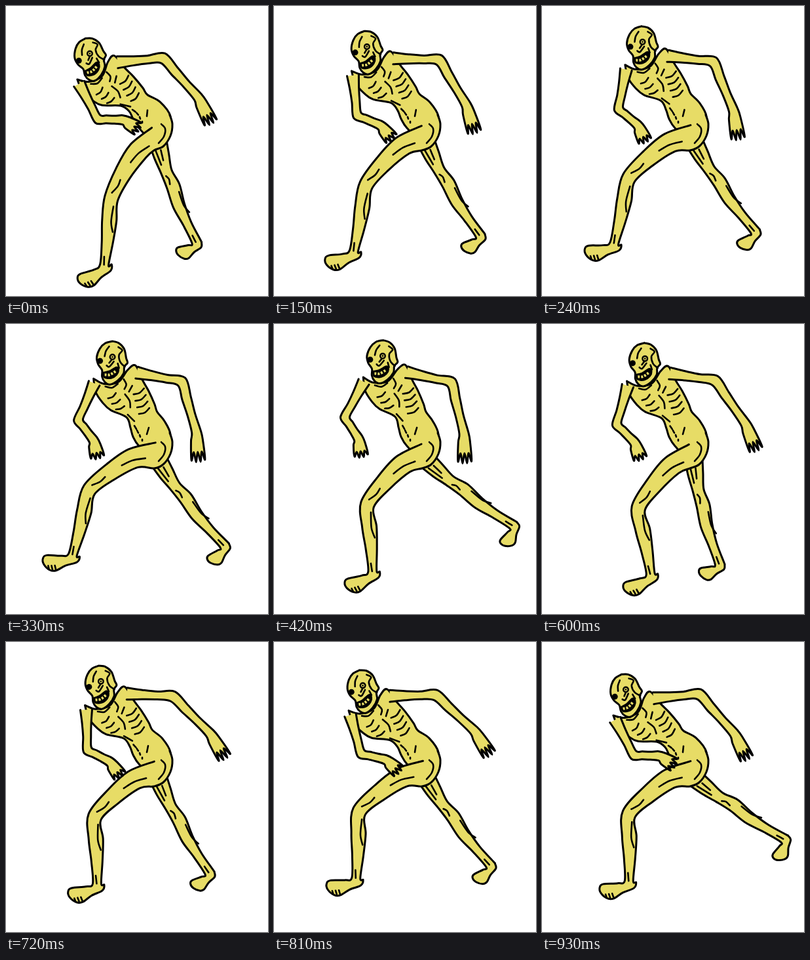
An HTML page with a canvas that plays this animation: 400 px wide and 442 px high, repeating every 0.96 s.

```html
<!DOCTYPE html>
<html lang="en">
<head>
<meta charset="utf-8">
<style>
  html, body { margin: 0; width: 100%; height: 100%; overflow: hidden; background: #fff; }
  canvas { display: block; }
</style>
</head>
<body>
<canvas id="stage" width="400" height="442"></canvas>
<script>
const ctx = document.getElementById('stage').getContext('2d');
const SKIN = '#e7dc66', INK = '#000';
const LOOP = 960, STEP = 30;
const PIVOT = [228, 190];

const rad = degrees => degrees * Math.PI / 180;
const clamp = u => Math.min(1, Math.max(0, u));
const blend = (a, b, u) => a.map((value, i) => value + (b[i] - value) * u);
const easeOut = u => u * (1.4 - 0.4 * u);
const points = text => text.split(' ').map(pair => pair.split(',').map(Number));

// Lean, then upper arm / forearm / hand angles, left and right.
const CROUCH = [15.5, 62, 2, 30, -5, 48, 63];
const UPRIGHT = [-1.2, 118, 58, 80, 13, 76, 88];
const PEAK = 420, CROUCHED = 930;

// Thigh / shin / foot angles, front and back; each stride ends in a cut.
const STRIDES = [
  { times: [0, 370, 480], poses: [
    [128, 96, 147, 73, 68, 149], [154.5, 105, 168, 55, 50, 130], [128, 70, 138, 28.5, 25.6, 102]] },
  { times: [570, 840, 930], poses: [
    [134, 77, 147, 85, 79, 156], [151, 94, 164, 55, 51, 132], [147.5, 90, 161, 36.5, 34.4, 110]] }
];

// Half widths run evenly from root to end, on the front and back of each limb.
const LIMBS = {
  leftArm: { root: [135, 90], lengths: [61, 38], front: [9, 7, 6, 7, 6, 6, 7], reach: 31 },
  rightArm: { root: [200, 74], lengths: [70, 79], front: [9, 7, 6, 8, 7, 6, 7], reach: 48 },
  frontLeg: {
    root: [236, 196], lengths: [123, 102], foot: 1,
    front: [17, 27, 22, 10, 10, 7, 6], back: [20, 4, 4, 11, 12, 10, 7],
    seat: points('250,166 254,180 251,198 240,214 226,220')
  },
  backLeg: {
    root: [234, 205], lengths: [73, 91.6], foot: 0.72,
    front: [16, 15, 12, 10, 12, 8, 6], back: [11, 8, 5, 10, 6, 5, 8]
  }
};
const FOOT = points('-10,6 -4,13 14,14 30,18 39,15 46,4 45,-5 38,-8 17,-2');

const TORSO = points('134,83 150,91 172,88 186,70 198,63 209,86 218,102 227,122 231,134 242,148 251,168 248,195 225,205 203,186 194,172 190,158 184,142 160,131 148,120 137,103 134,83');
const BODY_LINES = [
  '152,95 162,97 171,91', '180,84 184,92 181,99', '193,94 188,103',
  '182,107 189,117 190,127', '186,138 196,148', '218,158 215,168'
].map(points);
for (let i = 0; i < 4; i++) {
  const x = 195 + 2.7 * i, y = 107 + 10 * i;
  BODY_LINES.push([[x, y], [x + 9, y - 2], [x + 16, y - 9]]);
  BODY_LINES.push([[196 + 4 * i, 155 + 7 * i], [199 + 3 * i, 160 + 6 * i]]);
  if (i < 3) BODY_LINES.push([[156 + 6 * i, 113 + 8.5 * i], [163 + 6 * i, 111 + 9 * i], [168 + 6.5 * i, 105 + 10 * i]]);
}

const SKULL = points('163,26 173,29 181,38 184,52 186,59 181,65 180,75 171,86 159,92 151,88 147,80 147,70 141,61 139,50 144,37 152,29 163,26');
const FACE_LINES = [
  '158,34 153,41 151,49', '172,35 178,40 173,47 175,58 182,65',
  '165,57 158,65 154,63', '158,59 162,54', '171,60 173,67'
].map(points);
const MOUTH = points('149,74 158,72 169,66 172,70 169,77 161,82 151,81 149,74');
const TEETH = points('151,77 159,77 169,71');

// The chest turns about the pelvis; the waist bends in between.
function bend([x, y], lean) {
  const angle = -rad(lean) * clamp((165 - y) / 30);
  const c = Math.cos(angle), s = Math.sin(angle);
  const dx = x - PIVOT[0], dy = y - PIVOT[1];
  return [PIVOT[0] + dx * c - dy * s, PIVOT[1] + dx * s + dy * c];
}

// Point at a distance along a direction and sideways from it.
function offset([x, y], degrees, along, side) {
  const c = Math.cos(rad(degrees)), s = Math.sin(rad(degrees));
  return [x + along * c - side * s, y + along * s + side * c];
}

function trace(p) {
  ctx.beginPath();
  ctx.moveTo(...p[0]);
  for (let i = 0; i < p.length - 1; i++) {
    const before = p[Math.max(i - 1, 0)], a = p[i], b = p[i + 1];
    const after = p[Math.min(i + 2, p.length - 1)];
    ctx.bezierCurveTo(
      a[0] + (b[0] - before[0]) / 6, a[1] + (b[1] - before[1]) / 6,
      b[0] - (after[0] - a[0]) / 6, b[1] - (after[1] - a[1]) / 6, ...b);
  }
}

function line(p, width = 2.6, color = INK) {
  ctx.strokeStyle = color;
  ctx.lineWidth = width;
  trace(p);
  ctx.stroke();
}

function shape(p, fill = SKIN) {
  trace(p);
  ctx.fillStyle = fill;
  ctx.fill();
  line(p, 3);
}

function handOutline(reach) {
  const hand = [[reach * 0.25, -9]];
  for (let i = 0; i < 4; i++) {
    const side = -9 + 6 * i;
    hand.push([reach - 3 * Math.abs(i - 1.5), side * 1.15]);
    if (i < 3) hand.push([reach * 0.65, side + 3]);
  }
  return [...hand, [reach * 0.3, 9]];
}

function drawLimb({ root, lengths, front, back = front, reach, foot, seat = [] }, angles, start = root) {
  const [upper, lower, end] = angles;
  const middle = offset(start, upper, lengths[0], 0);
  const tip = offset(middle, lower, lengths[1], 0);
  const along = (u, side) => {
    if (u === 1) return offset(middle, (upper + lower) / 2, 0, side);
    return u < 1 ? offset(start, upper, u * lengths[0], side)
                 : offset(middle, lower, (u - 1) * lengths[1], side);
  };
  const mark = (...stops) => line(stops.map(([u, side]) => along(u, side)));
  const frontEdge = front.map((width, i) => along(i / 3, width));
  const backEdge = back.map((width, i) => along(i / 3, -width));
  const extremity = foot
    ? FOOT.map(([x, y]) => offset(tip, end, x * foot, -y * (foot + 1) / 2))
    : handOutline(reach).map(([x, y]) => offset(tip, end, x, y));
  if (seat.length) backEdge.shift();
  shape([...seat, ...backEdge, ...extremity, ...frontEdge.reverse()]);

  if (!foot) return;
  mark([0.94, 4], [0.83, 3], [0.75, 6]);
  mark([1.12, -5], [1.35, -4], [1.5, -8]);
  mark([1.88, 1], [2, 0]);
  if (seat.length) {
    mark([0.2, 3], [0.35, 9], [0.5, 10]);
    line(points('237,180 243,187 241,199 233,209'));
    for (let i = 0; i < 3; i++)
      line([[30 + 5 * i, 17 - 2 * i], [30 + 5 * i, 10 - i]].map(([x, y]) => offset(tip, end, x, -y)));
  } else {
    mark([0.15, 10], [0.5, 8]);
    mark([0.2, 2], [0.42, 3]);
  }
}

function drawHead(lean) {
  const place = list => list.map(point => bend(point, lean));
  const dot = (x, y, radius, color) => {
    ctx.beginPath();
    ctx.arc(...bend([x, y], lean), radius, 0, 7);
    ctx.fillStyle = color;
    ctx.fill();
  };
  shape(place(SKULL));
  FACE_LINES.forEach(stroke => line(place(stroke)));
  dot(144, 56, 4.5, INK);
  dot(163, 50, 5, INK);
  dot(163, 50, 2.5, SKIN);
  dot(163, 50, 1.3, INK);
  shape(place(MOUTH), INK);
  ctx.setLineDash([3, 2]);
  ctx.lineCap = 'butt';
  line(place(TEETH), 4, SKIN);
  ctx.setLineDash([]);
  ctx.lineCap = 'round';
}

function upperPose(time) {
  const falling = time > PEAK;
  const u = falling ? (CROUCHED - time) / (CROUCHED - PEAK) : time / PEAK;
  const pose = blend(CROUCH, UPRIGHT, Math.sin(Math.PI / 2 * clamp(u)) ** 1.5);
  const swing = falling ? 17 * Math.sin(Math.PI * clamp(u)) : 0;
  pose[5] -= swing;
  pose[6] -= swing;
  return pose;
}

function legPose(time) {
  const { times, poses } = STRIDES[time < 570 ? 0 : 1];
  const i = time < times[1] ? 0 : 1;
  const u = clamp((time - times[i]) / (times[i + 1] - times[i]));
  return blend(poses[i], poses[i + 1], easeOut(u));
}

function render(time) {
  const [lean, ...arms] = upperPose(time);
  const legs = legPose(time);
  const arm = (limb, angles) => drawLimb(limb, angles, bend(limb.root, lean));

  ctx.fillStyle = '#fff';
  ctx.fillRect(0, 0, 400, 442);
  drawLimb(LIMBS.backLeg, legs.slice(3));
  shape(TORSO.map(point => bend(point, lean)));
  drawLimb(LIMBS.frontLeg, legs.slice(0, 3));
  BODY_LINES.forEach(stroke => line(stroke.map(point => bend(point, lean))));
  arm(LIMBS.rightArm, arms.slice(3));
  arm(LIMBS.leftArm, arms.slice(0, 3));
  drawHead(lean);
}

ctx.lineCap = ctx.lineJoin = 'round';
const begin = performance.now();
function tick() {
  const elapsed = (performance.now() - begin) % LOOP;
  render(Math.floor(elapsed / STEP) * STEP);
  requestAnimationFrame(tick);
}
tick();
</script>
</body>
</html>
```
